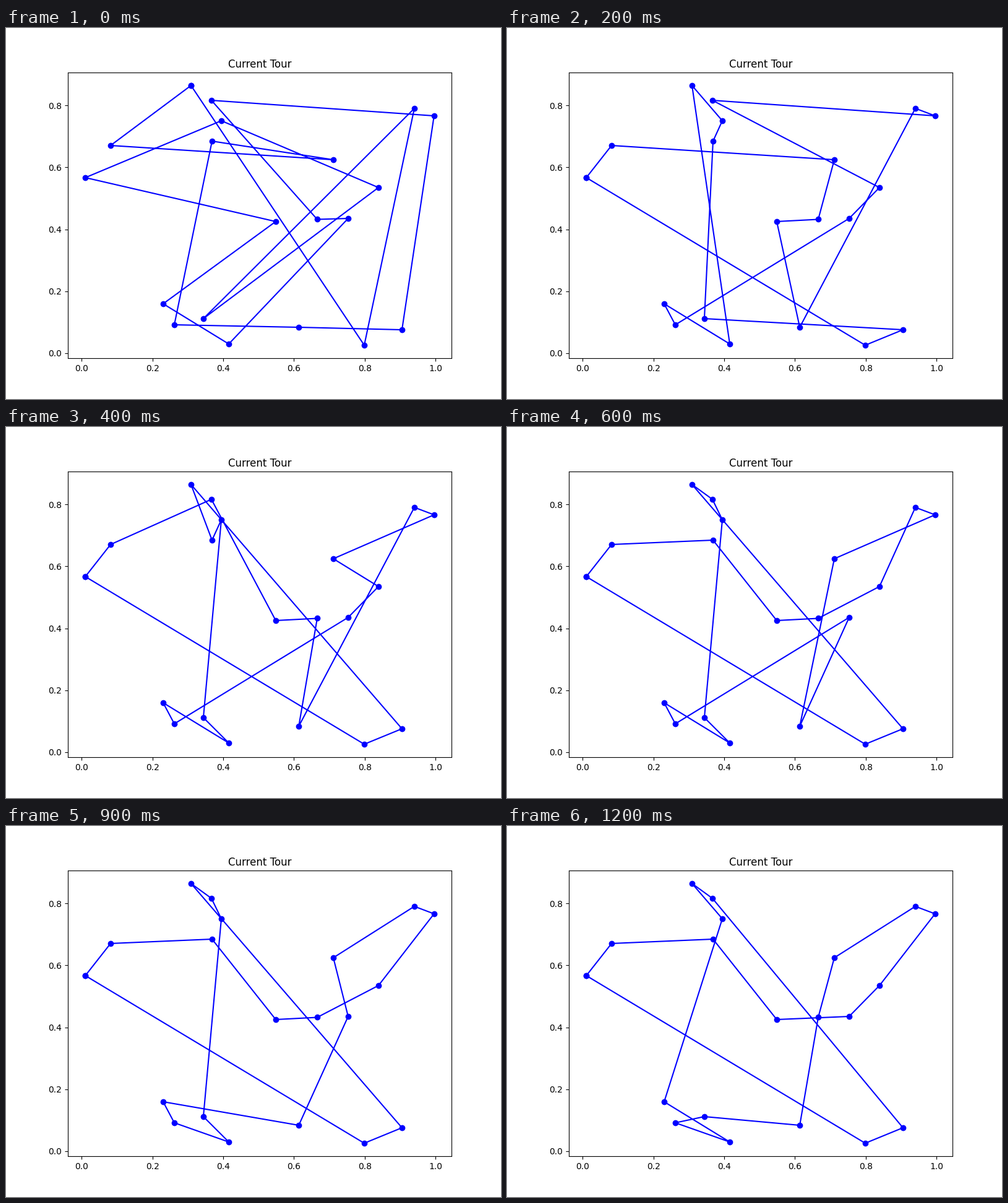
Write a matplotlib script that moves like this. It is 800x600 px and loops after 1.3 s.

```python
import matplotlib.pyplot as plt
from matplotlib.animation import FuncAnimation

# Cities in the order of the first tour, named A, B, C, ...
POINTS = [
    (0.3091, 0.8644), (0.0818, 0.6707), (0.7113, 0.6247), (0.3685, 0.6847),
    (0.2619, 0.0916), (0.6136, 0.0836), (0.9053, 0.0756), (0.9960, 0.7665),
    (0.3668, 0.8165), (0.6658, 0.4321), (0.7532, 0.4351), (0.4158, 0.0297),
    (0.2304, 0.1595), (0.5486, 0.4251), (0.0104, 0.5669), (0.3948, 0.7506),
    (0.8389, 0.5349), (0.3440, 0.1116), (0.9403, 0.7905), (0.7987, 0.0257),
]
NAMES = "ABCDEFGHIJKLMNOPQRST"
CITIES = dict(zip(NAMES, POINTS))

# Cities that trade places in each step of the search
STEPS = "DJ DQ LN, AO EN GS, CI JN, AR, DI, FQ, HS, FK, EM, JK, MR, AI".split(", ")


def swap(tour, pair):
    return tour.translate(str.maketrans(pair, pair[::-1]))


def path(tour):
    """Coordinates of the closed route."""
    return list(zip(*(CITIES[name] for name in tour + tour[0])))


tours = [NAMES]
for step in STEPS:
    tour = tours[-1]
    for pair in step.split():
        tour = swap(tour, pair)
    tours.append(tour)

fig, ax = plt.subplots(figsize=(8, 6), dpi=100)
ax.set_title("Current Tour")
line, = ax.plot(*path(NAMES), "bo-")


def update(i):
    line.set_data(*path(tours[i]))
    return line,


anim = FuncAnimation(fig, update, frames=len(tours), interval=100,
                     repeat=True, repeat_delay=0)
plt.show()
```
